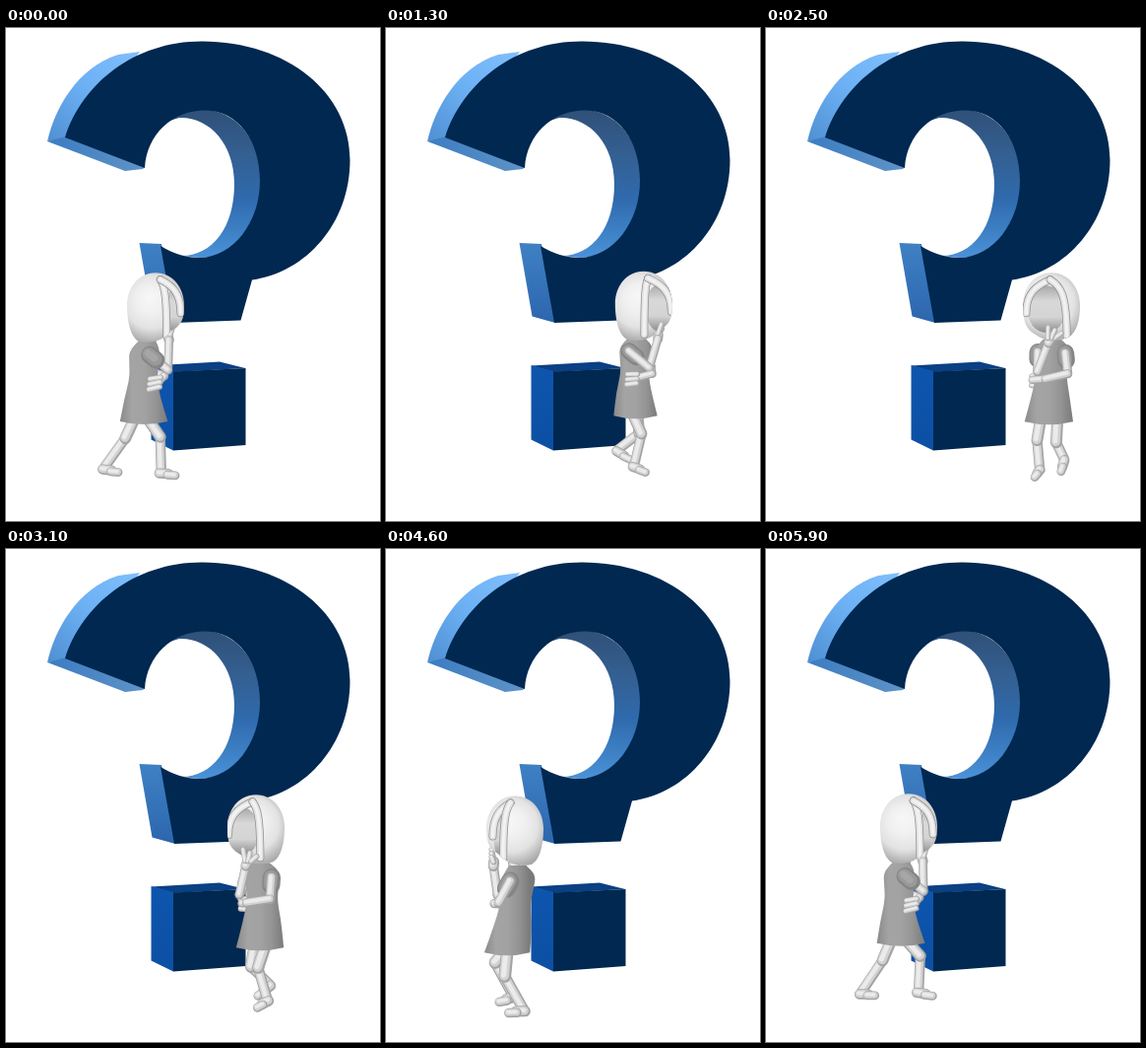
These frames come from a looping animation (380x500 px, 6000 ms). An HTML page with a canvas:

```html
<!DOCTYPE html>
<html lang="en">
<head>
<meta charset="utf-8">
<title>Pacing thinker</title>
<style>
  html, body { margin: 0; width: 100%; height: 100%; overflow: hidden; background: #fff; }
  svg, canvas { position: absolute; left: 0; top: 0; width: 380px; height: 500px; }
</style>
</head>
<body>
<svg viewBox="0 0 380 500">
  <defs>
    <linearGradient id="edge" x1="1" y1="0" x2="0" y2="1">
      <stop offset="0" stop-color="#80bffc"/><stop offset=".5" stop-color="#6cb0f4"/><stop offset="1" stop-color="#4f8fd2"/>
    </linearGradient>
    <linearGradient id="under">
      <stop offset="0" stop-color="#3b7cc2"/><stop offset="1" stop-color="#5f93c6"/>
    </linearGradient>
    <linearGradient id="inner" x1="0" y1="0" x2="0" y2="1">
      <stop offset="0" stop-color="#2f5078"/><stop offset=".3" stop-color="#345f91"/><stop offset=".6" stop-color="#2f6aad"/><stop offset="1" stop-color="#4a92d8"/>
    </linearGradient>
    <linearGradient id="neck" x1="0" y1="0" x2="0" y2="1">
      <stop offset="0" stop-color="#3f80c4"/><stop offset="1" stop-color="#2c66ae"/>
    </linearGradient>
    <linearGradient id="cube" x1="0" y1="0" x2="0" y2="1">
      <stop offset="0" stop-color="#0e55ae"/><stop offset="1" stop-color="#0c50a4"/>
    </linearGradient>
  </defs>
  <path fill="url(#edge)" d="M42 115C49 83 72 40 114 27L136 24L110 60L62 112Z"/>
  <path fill="url(#under)" d="M42 115L61 110L141 141L139 143L121 145Z"/>
  <path fill="url(#inner)" d="M160 96C175 83 192 81 206 83C240 88 259 120 259 155C258 198 231 233 197 233L178 231C210 231 232 202 232 158C232 118 207 90 176 91Z"/>
  <path fill="url(#neck)" d="M135.500 218L158 219L172 299L148.500 292.500Z"/>
  <path fill="#002850" d="M60 111C77 57 130 13.500 199 13.500C287 14 349.500 66 349.500 134C349.500 198 305 248 250 255.500L238.500 296.500L171 299L157 221C170 229 183 233 197 233C231 232 258 197 258 155C258 114 235 84 203 83.500C169 83 143 108 141 142Z"/>
  <path fill="#0a4084" d="M147.500 342.500L217 338.500L243 345L170 349Z"/>
  <path fill="url(#cube)" d="M147.500 342L170 348L170 428.500L147.500 417.500Z"/>
  <path fill="#002850" d="M170 348.500L243.500 345L243.500 423L170 428.500Z"/>
</svg>
<canvas id="stage" width="380" height="500"></canvas>
<script>
const ctx = document.getElementById('stage').getContext('2d');
const LOOP = 6000, STEP = 100, RAD = Math.PI / 180;
const SKIN = ['#a4a4a4', '#d2d2d2', '#ebebeb'];
const CLOTH = ['#858585', '#999999', '#a6a6a6'];

// time, hem x, head x, ground y, yaw (0 right, 90 to viewer), stride
const KEYS = [
  [0, 140, 152, 456, -15, 27],
  [800, 207, 217, 449, 18, 20],
  [1400, 262, 270, 448, 35, 22],
  [1800, 289, 295, 449, 62, 14],
  [2200, 294, 297, 452, 90, 10],
  [2700, 280, 282, 459, 115, 14],
  [3100, 258, 254, 463, 135, 16],
  [3900, 187, 187, 463, 172, 20],
  [4600, 123, 131, 470, 205, 14],
  [4950, 108, 113, 465, 240, 12],
  [5300, 106, 112, 460, 290, 10],
  [5600, 119, 126, 458, 325, 18],
  [5900, 137, 145, 457, 342, 27]
];
// height, half width from the side, half width from the front, forward offset
const DRESS = [
  [135, 7, 9, -5], [126, 14, 18, -7], [113, 14, 16, -6],
  [98, 13, 15, -5], [78, 17, 19, -4], [55, 16, 24, 0]
];

const mix = (a, b, k) => a + (b - a) * k;

function key(i) {
  const n = KEYS.length, turn = Math.floor(i / n), k = KEYS[i - turn * n].slice();
  k[0] += turn * LOOP;
  k[4] += turn * 360;
  return k;
}

// Smooth cubic through the periodic keys
function poseAt(t) {
  let i = KEYS.length - 1;
  while (KEYS[i][0] > t) i--;
  const [a, b, c, d] = [key(i - 1), key(i), key(i + 1), key(i + 2)];
  const span = c[0] - b[0], u = (t - b[0]) / span, v = 1 - u;
  return b.map((p, j) => {
    const m0 = (c[j] - a[j]) / (c[0] - a[0]) * span;
    const m1 = (d[j] - p) / (d[0] - b[0]) * span;
    return (1 + 2 * u) * v * v * p + u * v * v * m0 + u * u * (3 - 2 * u) * c[j] - u * u * v * m1;
  });
}

function tube(points, width, tones = SKIN) {
  ctx.lineCap = ctx.lineJoin = 'round';
  [1, 0.76, 0.4].forEach((w, i) => {
    const shift = -i * width * 0.05;
    ctx.beginPath();
    points.forEach(([x, y]) => ctx.lineTo(x + shift, y + shift));
    ctx.strokeStyle = tones[i];
    ctx.lineWidth = width * w;
    ctx.stroke();
  });
}

function curve(points) {
  ctx.lineTo(points[0][0], points[0][1]);
  for (let i = 1; i < points.length - 1; i++) {
    const [x, y] = points[i], [p, q] = points[i + 1];
    ctx.quadraticCurveTo(x, y, (x + p) / 2, (y + q) / 2);
  }
  const end = points[points.length - 1];
  ctx.lineTo(end[0], end[1]);
}

function ramp(grad, colors) {
  colors.forEach((c, i) => grad.addColorStop(i / (colors.length - 1), c));
  return grad;
}

function drawHead(x, y, cos, sin) {
  const skew = 4 * cos, right = y + 29 - 6 * cos, left = y + 29 + 6 * cos;
  ctx.save();
  ctx.beginPath();
  ctx.moveTo(x, y - 35);
  ctx.bezierCurveTo(x + 19, y - 35, x + 29, y - 18, x + 29, y - 2);
  ctx.bezierCurveTo(x + 29, y + 13, x + 26, right - 5, x + 17, right);
  ctx.quadraticCurveTo(x + skew, y + 39, x - 17, left);
  ctx.bezierCurveTo(x - 26, left - 5, x - 29, y + 13, x - 29, y - 2);
  ctx.bezierCurveTo(x - 29, y - 18, x - 19, y - 35, x, y - 35);
  ctx.fillStyle = ramp(ctx.createRadialGradient(x - 6, y - 10, 2, x - 3, y - 3, 40),
    ['#f6f6f6', '#f0f0f0', '#e2e2e2', '#a8a8a8']);
  ctx.fill();
  ctx.clip();

  const rx = 9 + 11 * sin;
  if (rx > 0.5) {
    const fx = x + 19 * cos, fy = y + 2;
    ctx.beginPath();
    ctx.ellipse(fx, fy, rx, 24, 0, 0, 7);
    ctx.fillStyle = ramp(ctx.createLinearGradient(0, fy - 24, 0, fy + 24),
      ['#a8a8a8', '#d8d8d8', '#d4d4d4', '#8c8c8c']);
    ctx.fill();
    const top = x + 5 * cos;
    for (const side of [-1, 1]) {
      const out = Math.max(x - 28, Math.min(x + 28, fx + side * (rx + 1)));
      const tip = y + (side * cos < 0 ? 29 : 6);
      for (const [w, c] of [[8, '#8f8f8f'], [6.5, '#e2e2e2'], [3, '#f2f2f2']]) {
        ctx.beginPath();
        ctx.moveTo(top, y - 28);
        ctx.bezierCurveTo(mix(top, out, 0.6), y - 22, out, y - 14, out, tip);
        ctx.strokeStyle = c;
        ctx.lineWidth = w;
        ctx.stroke();
      }
    }
  }
  ctx.restore();
}

function draw(t) {
  const [, x, headX, ground, yaw, stride] = poseAt(t);
  const cos = Math.cos(yaw * RAD), sin = Math.sin(yaw * RAD);
  const scale = (ground - 249) / 200;
  const gait = (t / LOOP * 1800 + 15) * RAD;

  // forward, rightward, height -> screen x, y and nearness
  const at = (f, r, h) => {
    const lean = Math.max(0, Math.min(1, (h - 54) / 113));
    const z = f * sin + r * cos;
    return [mix(x, headX, lean) + scale * (f * cos - r * sin),
      ground - h * scale + z * 0.3 * (1 - h / 200), z];
  };
  const part = (points, width, tones) => ({
    z: points.reduce((s, p) => s + p[2], 0) / points.length,
    draw: () => tube(points, width * scale, tones)
  });
  const paint = list => list.sort((a, b) => a.z - b.z).forEach(p => p.draw());

  function leg(side) {
    const phase = gait + (side < 0 ? Math.PI : 0);
    const lift = 9 * Math.max(0, -Math.sin(phase));
    const f = stride * Math.cos(phase) - 11, h = 8 + lift;
    const hipF = -4, hip = 66, upper = 31, lower = 33;
    const dist = Math.min(Math.hypot(f - hipF, hip - h), upper + lower - 0.5);
    const bend = Math.acos((upper ** 2 + dist ** 2 - lower ** 2) / (2 * upper * dist));
    const a = Math.atan2(f - hipF, hip - h) + bend;
    const knee = at(hipF + upper * Math.sin(a), 9 * side, hip - upper * Math.cos(a));
    const ankle = at(f, 10 * side, h);
    const parts = [
      part([at(hipF, 8 * side, hip), knee, ankle], 10),
      part([at(hipF, 8 * side, hip), knee], 11.5),
      part([at(f - 2, 10 * side, h - 2), at(f + 7, 10.5 * side, 5 + lift * 0.6)], 10),
      part([at(f + 6, 10.5 * side, 4 + lift * 0.6), at(f + 14, 11 * side, 3 + lift * 0.4)], 8.5)
    ];
    return { z: ankle[2], draw: () => parts.forEach(p => p.draw()) };
  }

  function dress() {
    const spread = 0.28 * Math.abs(stride * Math.cos(gait));
    const edge = side => DRESS.map(([h, s, w, f]) => {
      const [px, py] = at(f, 0, h);
      const flare = h < 60 ? spread : 0;
      return [px + side * scale * mix(s + flare, w, Math.abs(sin)), py];
    });
    const left = edge(-1), right = edge(1), l = left[5], r = right[5];
    ctx.beginPath();
    curve(left);
    ctx.quadraticCurveTo((l[0] + r[0]) / 2, l[1] + 6, r[0], r[1]);
    curve(right.reverse());
    ctx.closePath();
    ctx.fillStyle = ramp(ctx.createLinearGradient(l[0], 0, r[0], 0),
      ['#8a8a8a', '#a4a4a4', '#a2a2a2', '#949494', '#7a7a7a']);
    ctx.fill();
  }

  const shoulderR = at(-5, 14, 122), elbowR = at(17, 8, 106), chin = at(18, -3, 134);
  const shoulderL = at(-5, -14, 122), elbowL = at(3, -19, 103);
  const cross = at(16, 0, 99), waist = at(6, 16, 96);
  const sleeve = (a, b) => part([a, a.map((v, i) => mix(v, b[i], 0.35))], 17, CLOTH);
  const arms = [
    part([shoulderR, elbowR], 9), sleeve(shoulderR, elbowR),
    part([elbowR, chin], 8.5),
    part([shoulderL, elbowL], 9), sleeve(shoulderL, elbowL),
    part([elbowL, cross], 8.5), part([cross, waist], 8),
    part([chin, at(17, -5, 138)], 10)
  ];
  for (let i = 0; i < 3; i++) {
    arms.push(part([at(18 - i, -2 - i * 3, 138), at(21 - i * 3, -3 - i * 6, 149 - i * 3)], 5));
    arms.push(part([at(8, 16, 100 - i * 4.5), at(-3, 17, 99 - i * 5)], 5.5));
  }

  ctx.clearRect(0, 0, 380, 500);
  paint([leg(1), leg(-1)]);
  paint(arms.filter(p => p.z <= 0));
  tube([at(-4, 0, 126), at(0, 0, 142)], 12);
  dress();
  drawHead(headX, ground - 167 * scale, cos, sin);
  paint(arms.filter(p => p.z > 0));
}

function tick() {
  draw(Math.floor(performance.now() % LOOP / STEP) * STEP);
  requestAnimationFrame(tick);
}
tick();
</script>
</body>
</html>
```
